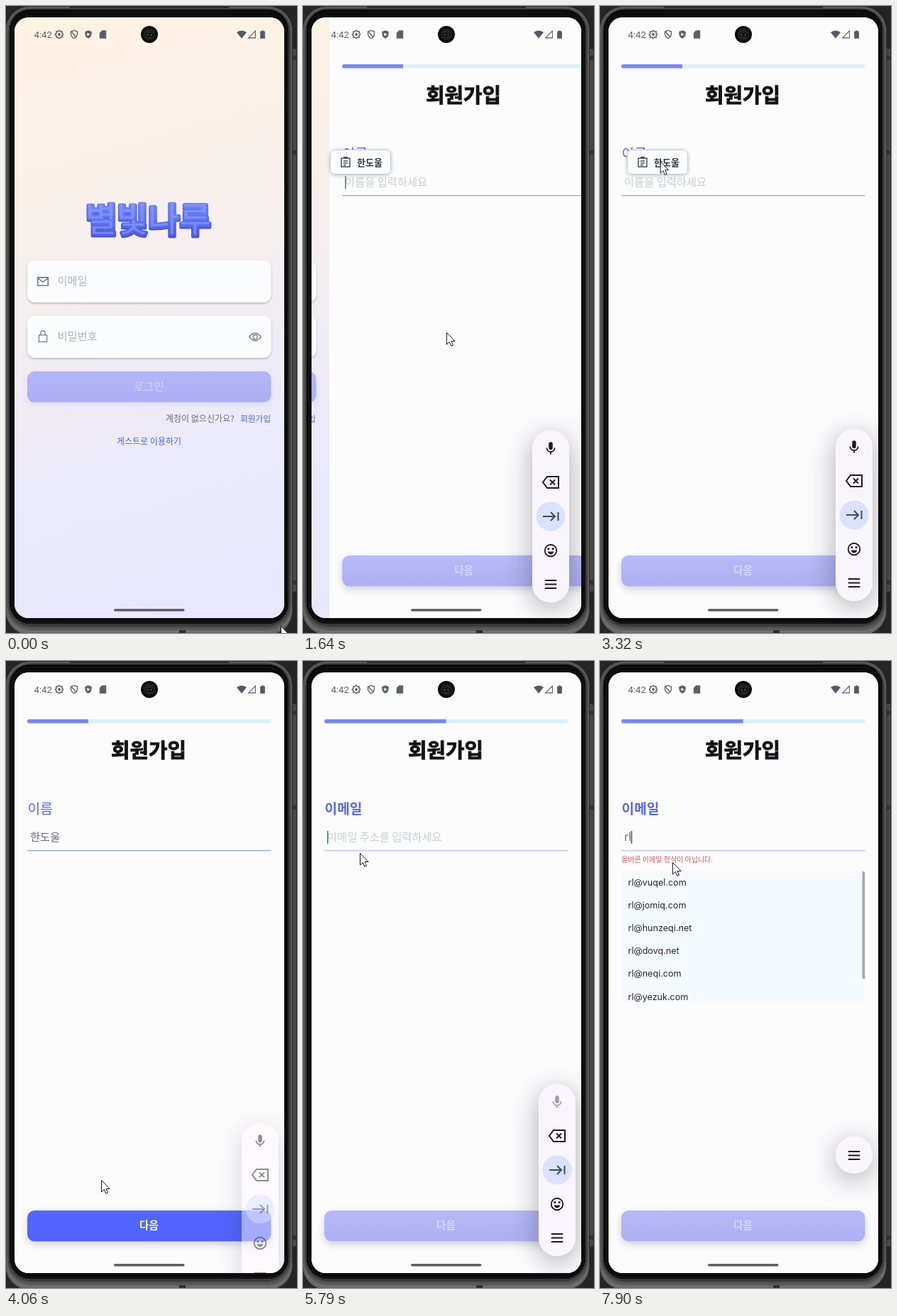
An HTML page with a canvas for the animation above (8000 ms loop, 410 by 882 pixels).

```html
<!DOCTYPE html>
<html lang="ko">
<head>
<meta charset="utf-8">
<title>Sign-up flow</title>
<style>
html, body { margin: 0; width: 100%; height: 100%; overflow: hidden; background: #262626; }
canvas { display: block; width: 410px; height: 882px; }
</style>
</head>
<body>
<canvas id="stage"></canvas>
<script>
const W = 410, H = 882, LOOP = 8000, PAGE = 380;
const canvas = document.getElementById('stage');
const dpr = window.devicePixelRatio || 1;
canvas.width = W * dpr;
canvas.height = H * dpr;
const c = canvas.getContext('2d');

const KR = '"Noto Sans CJK KR", "Noto Sans CJK", sans-serif';
const LATIN = 'Inter, "Noto Sans", sans-serif';
const PERSON = '한도울';
const DOMAINS = ['vuqel.com', 'jomiq.com', 'hunzeqi.net', 'dovq.net', 'neqi.com', 'yezuk.com'];

const clamp = v => Math.max(0, Math.min(1, v));
const mix = (a, b, k) => a + (b - a) * k;
const within = (t, a, b) => t >= a && t < b;
const easeInOut = k => k < 0.5 ? 4 * k ** 3 : 1 - 4 * (1 - k) ** 3;
const slide = (t, start) => easeInOut(clamp((t - start) / 746));

function box(x, y, w, h, r, fill, stroke) {
  c.beginPath();
  c.roundRect(x, y, w, h, r);
  if (fill) { c.fillStyle = fill; c.fill(); }
  if (stroke) { c.strokeStyle = stroke; c.stroke(); }
}

// The shadow stays outside the box, so translucent boxes remain clean
function shadowBox(x, y, w, h, r, fill, color, blur, dy) {
  c.save();
  c.beginPath();
  c.rect(-W, -H, 3 * W, 3 * H);
  c.roundRect(x, y, w, h, r);
  c.clip('evenodd');
  c.shadowColor = color;
  c.shadowBlur = blur * dpr;
  c.shadowOffsetY = dy * dpr;
  box(x, y, w, h, r, '#fff');
  c.restore();
  box(x, y, w, h, r, fill);
}

function dot(x, y, r, fill) {
  c.beginPath();
  c.arc(x, y, r, 0, 7);
  c.fillStyle = fill;
  c.fill();
}

// y is the visual middle of the line; bold thickens the strokes
function text(s, x, y, size, weight, color, { align = 'left', family = KR, bold = 0 } = {}) {
  c.font = `${weight} ${size}px ${family}`;
  c.textAlign = align;
  c.fillStyle = c.strokeStyle = color;
  c.fillText(s, x, y + size * 0.37);
  if (!bold) return;
  c.lineWidth = bold;
  c.strokeText(s, x, y + size * 0.37);
}

function vertical(y0, y1, ...stops) {
  const g = c.createLinearGradient(0, y0, 0, y1);
  stops.forEach((s, i) => g.addColorStop(i / (stops.length - 1), s));
  return g;
}

// Icons live in a 24-unit box centred on zero
const ICONS = {
  mail: 'M-9-7H9V7H-9ZM-9-6L0 1L9-6',
  lock: 'M-7-2H7V10H-7ZM-4-2V-6A4 4 0 0 1 4-6V-2',
  eye: 'M-11 0Q0-14 11 0Q0 14-11 0ZM4 0A4 4 0 1 1-4 0A4 4 0 1 1 4 0',
  mic: 'M0-10A3 3 0 0 1 3-7V-1A3 3 0 0 1-3-1V-7A3 3 0 0 1 0-10ZM-7-1H-5.2A5.2 5.2 0 0 0 5.2-1H7A7 7 0 0 1 1 6V9H-1V6A7 7 0 0 1-7-1Z',
  erase: 'M-5-8H11V8H-5L-11 0ZM-1-3.5L6 3.5M6-3.5L-1 3.5',
  tab: 'M-11 0H6M0-6L6 0L0 6M10.5-6V6',
  face: 'M9 0A9 9 0 1 1-9 0A9 9 0 1 1 9 0',
  grin: 'M-5 1.5H5Q3 6 0 6Q-3 6-5 1.5ZM-5-4H-2V-1H-5ZM2-4H5V-1H2Z',
  menu: 'M-9-6H9M-9 0H9M-9 6H9',
  clip: 'M-8-7H8V9H-8ZM-3-7V-9H3V-7M-4-2H4M-4 2H4M-4 5.5H1',
  shield: 'M0-10L8-7V-1Q7 7 0 10Q-7 7-8-1V-7Z',
  play: 'M-3-4L5 0L-3 4Z',
  card: 'M-2-10H8V10H-8V-4Z',
  wifi: 'M-12-5Q0-14 12-5L0 10Z',
  signal: 'M-9 9H9V-9Z',
  battery: 'M-6-8H-2.5V-10H2.5V-8H6V10H-6Z'
};
for (const k in ICONS) ICONS[k] = new Path2D(ICONS[k]);

// A line width of 0 fills the shape
function icon(name, x, y, size, color, line = 0) {
  c.save();
  c.translate(x, y);
  c.scale(size / 24, size / 24);
  c.fillStyle = c.strokeStyle = color;
  c.lineWidth = line;
  line ? c.stroke(ICONS[name]) : c.fill(ICONS[name]);
  c.restore();
}

function drawPhone() {
  c.fillStyle = '#262626';
  c.fillRect(0, 0, W, H);
  box(398, 60, 11, 764, 3, '#4a4a4a');
  c.fillStyle = '#333';
  for (const y of [70, 203, 808]) c.fillRect(403, y, 6, 6);
  c.lineWidth = 1;
  box(-0.5, 0.5, 404, 884, 34, '#6a6a6a', '#3a3a3a');
  box(2.5, 2.5, 399, 877, 32, '#626262', '#7c7c7c');
  shadowBox(4.5, 4.5, 394, 865, 30, '#0a0a0a', '#000', 8, 1);
  box(7.5, 8.5, 389, 859, 27, '#0c0c0c', '#161616');
  c.fillStyle = '#2e2e2e';
  c.fillRect(90, 0, 224, 3);
  c.fillRect(244, 878, 9, 4);
}

function drawStatus() {
  const ink = '#5d6068';
  text('4:42', 39.5, 40, 13.2, 400, ink, { family: 'Roboto, sans-serif' });
  c.strokeStyle = ink;
  c.lineWidth = 1.4;
  c.beginPath();
  for (let i = 0; i <= 48; i++) {
    const a = i * Math.PI / 24, r = 5 + 0.8 * Math.cos(8 * a);
    c.lineTo(75 + r * Math.cos(a), 40 + r * Math.sin(a));
  }
  c.stroke();
  dot(75, 40, 1.9, ink);
  icon('shield', 96, 40, 13.5, ink, 2.4);
  c.beginPath();
  c.moveTo(92.5, 36.5);
  c.lineTo(99, 44);
  c.stroke();
  icon('shield', 116, 40, 14, ink);
  icon('play', 116, 40, 13, '#fff');
  icon('card', 136.5, 40, 14, ink);
  icon('wifi', 332, 40, 14, '#515a67');
  icon('signal', 346.5, 40, 13, '#515a67', 2);
  icon('battery', 361.5, 40, 13.5, '#515a67');
  dot(202, 40, 12, '#0c0c0c');
  dot(202, 40, 8, '#222');
  box(196, 38, 12, 5, 2.5, '#101010');
  dot(199.5, 40.5, 0.9, '#777');
  dot(204.5, 40.5, 0.9, '#777');
}

// Puffy lettering: dark rim, shaded body, light core
function drawWordmark() {
  const word = '별빛나루', x = 200.5, y = 300;
  c.lineJoin = 'round';
  text(word, x, y + 0.8, 48, 700, '#4350cc', { align: 'center', bold: 5 });
  text(word, x, y, 48, 700, vertical(274, 328, '#7488f8', '#5f74f4', '#4a56dc'), { align: 'center', bold: 3.6 });
  text(word, x - 0.5, y - 1.2, 48, 300, 'rgba(140,162,255,.6)', { align: 'center' });
  c.lineJoin = 'miter';
}

function drawLogin() {
  const g = c.createLinearGradient(70, 16, 320, 861);
  g.addColorStop(0, '#fff3e2');
  g.addColorStop(0.4, '#f6efee');
  g.addColorStop(0.8, '#e9e9fc');
  g.addColorStop(1, '#e7e8ff');
  c.fillStyle = g;
  c.fillRect(12, 16, PAGE, 845);
  drawWordmark();
  for (const y of [358, 436])
    shadowBox(30, y, 343.5, 59, 11, '#fbfcfe', 'rgba(60,60,90,.35)', 3, 1.5);
  const ink = '#77778b';
  icon('mail', 52, 387.5, 19.5, ink, 2);
  icon('lock', 52, 464.5, 19, ink, 1.6);
  icon('eye', 351, 465.5, 18, ink, 1.7);
  text('이메일', 72.5, 386, 15.2, 400, '#b0afc2');
  text('비밀번호', 72.5, 464, 15.2, 400, '#b0afc2');
  shadowBox(30, 514, 343.5, 43.5, 10, vertical(514, 557, '#b3b6f6', '#abaef4'), 'rgba(140,145,225,.2)', 9, 3);
  text('로그인', 201.5, 535, 15.2, 400, '#d3d5fa', { align: 'center' });
  text('계정이 없으신가요?', 225, 580.5, 12, 400, '#6d6b7c');
  text('회원가입', 373, 580.5, 11.7, 500, '#5063f3', { align: 'right' });
  text('게스트로 이용하기', 201.5, 613, 12, 400, '#4a60f4', { align: 'center' });
}

function drawForm({ progress, label, weight, hint, value, caret, caretColor, enabled, line }) {
  c.fillStyle = '#fcfcfd';
  c.fillRect(12, 16, PAGE, 845);
  box(30, 82, 343.5, 5.5, 3, '#daf2ff');
  box(30, 82, 343.5 * progress, 5.5, [3, 0, 0, 3], '#7986fb');
  text('회원가입', 201, 125, 28.8, 900, '#131316', { align: 'center', bold: 0.9 });
  text(label, 30.5, 208, 19.2, weight, '#5667f0');
  text(value || hint, 34, 247, 15.3, 300, value ? '#666b84' : '#cbcdd2');
  if (caret) {
    c.fillStyle = caretColor;
    c.fillRect(caret, 239, 1.6, 18);
  }
  c.fillStyle = line;
  c.fillRect(30, 266, 343.5, 1.4);
  const fill = enabled ? '#5265ff' : vertical(773, 816, '#b6baf7', '#abb0f1');
  shadowBox(30, 773, 343.5, 43.5, 10, fill, 'rgba(70,75,110,.24)', 11, 4);
  text('다음', 201.5, 794, 14.6, 700, enabled ? '#fff' : '#d3d6f8', { align: 'center' });
}

function drawName(t) {
  const pasted = t >= 3500;
  const focused = t < 2000 || within(t, 2750, 3250) || within(t, 3500, 3900);
  drawForm({
    progress: 0.25, label: '이름', weight: 500, hint: '이름을 입력하세요',
    value: pasted ? PERSON : '', caret: focused && (pasted ? 77 : 34),
    caretColor: '#6b7078', enabled: pasted, line: '#9fa8f1'
  });
}

function drawEmail(t) {
  const typed = t < 6600 ? '' : t < 7900 ? 'r' : 'rl';
  const shown = within(t, 5600, 6100) || within(t, 6600, 7700) || t >= 7900;
  drawForm({
    progress: 0.5, label: '이메일', weight: 700, hint: '이메일 주소를 입력하세요',
    value: typed, caret: shown && [34, 40.5, 43.7][typed.length],
    caretColor: typed ? '#555a68' : '#17907f', line: '#bfc5f4'
  });
  if (t < 6670) return;
  text('올바른 이메일 형식이 아닙니다.', 30, 279.5, 10, 400, '#d4545d');
  c.save();
  c.beginPath();
  c.rect(30, 296, 343.5, 184);
  c.clip();
  c.fillStyle = '#f5faff';
  c.fillRect(30, 296, 343.5, 184);
  DOMAINS.forEach((d, i) =>
    text(`${typed}@${d}`, 39.5, 311 + i * 32.2, 12.6, 400, '#25272c', { family: LATIN }));
  box(369.5, 296, 4, 151, [0, 3, 0, 0], '#a7a7b1');
  c.restore();
}

function drawChip() {
  shadowBox(38, 202, 86, 35, 7, '#fff', 'rgba(50,60,90,.35)', 5, 1);
  c.lineWidth = 1;
  box(38.5, 202.5, 85, 34, 7, '#fdfdff', '#c9ccd6');
  icon('clip', 60, 219.5, 18, '#4a4d57', 2);
  text(PERSON, 76, 220, 13, 700, '#33363e');
}

// Each visit: shown from, hidden from, left, top
const VISITS = [[1400, 2000, 323, 597], [2750, 4000, 332, 595], [5250, LOOP, 332, 595]];

function drawToolbar(t) {
  const visit = VISITS.find(v => within(t, v[0], v[1] + 120));
  if (!visit) return;
  const [from, to, x, restY] = visit;
  const alpha = Math.min(clamp((t - from) / 150), clamp(1 - (t - to) / 120));
  const fold = easeInOut(clamp((t - 6600) / 280));
  const y = mix(restY, 669, fold) + 108 * (1 - alpha);
  const h = mix(242, 52, fold), cx = x + 26, ink = '#1d1b20';
  c.save();
  c.globalAlpha = alpha;
  shadowBox(x, y, 52, h, 26, '#f8f5fd', 'rgba(30,30,45,.36)', 38, 8);
  icon('menu', cx, y + h - 25.5, 22, ink, 2.2);
  c.globalAlpha = alpha * clamp(1 - fold * 2);
  if (c.globalAlpha > 0) {
    icon('mic', cx, y + 25.5, 22, from > 5000 ? '#a19fa8' : ink);
    icon('erase', cx, y + 73, 24, ink, 2);
    dot(cx, y + 121, 20.5, '#d9e2ff');
    icon('tab', cx, y + 121, 24, '#44465a', 2);
    icon('face', cx, y + 169, 22, ink, 2);
    icon('grin', cx, y + 169, 22, ink);
  }
  c.restore();
}

// Pointer tip: time, x, y
const TRAIL = [
  [70, 387, 872], [400, 300, 610], [620, 235, 533], [950, 324, 571], [1250, 324, 571],
  [1640, 202, 459], [2350, 167, 265], [2800, 165, 250], [3350, 84, 218], [3540, 84, 218],
  [4060, 134, 730], [4230, 138, 790], [4800, 138, 790], [5700, 80, 270], [5860, 80, 270],
  [6060, 74, 236], [6330, 84, 262], [6600, 84, 262], [7000, 102, 283]
];

function drawPointer(t) {
  let i = TRAIL.findIndex(p => p[0] > t);
  if (i < 0) i = TRAIL.length - 1;
  const b = TRAIL[i], a = TRAIL[Math.max(0, i - 1)];
  const k = clamp((t - a[0]) / (b[0] - a[0] || 1));
  const s = k * k * (3 - 2 * k);
  c.save();
  c.translate(mix(a[1], b[1], s) + 0.5, mix(a[2], b[2], s) + 0.5);
  const arrow = new Path2D('M0 0V16.5L3.8 13L6.3 18.8L9 17.6L6.6 12H11.6Z');
  c.fillStyle = '#fff';
  c.strokeStyle = '#15151c';
  c.lineWidth = 1;
  c.fill(arrow);
  c.stroke(arrow);
  c.restore();
}

function drawPage(dx, draw, t) {
  if (Math.abs(dx) >= PAGE) return;
  c.save();
  c.translate(dx, 0);
  c.beginPath();
  c.rect(12, 16, PAGE, 845);
  c.clip();
  draw(t);
  c.restore();
}

function render(t) {
  c.setTransform(dpr, 0, 0, dpr, 0, 0);
  drawPhone();
  c.save();
  c.beginPath();
  c.roundRect(12, 16, 380, 845, 20);
  c.clip();
  c.fillStyle = '#fcfcfd';
  c.fillRect(12, 16, PAGE, 845);
  const pos = slide(t, 1085) + slide(t, 4480);
  [drawLogin, drawName, drawEmail].forEach((draw, i) => drawPage((i - pos) * PAGE, draw, t));
  if (within(t, 1500, 2000) || within(t, 2900, 3500)) drawChip();
  drawToolbar(t);
  drawStatus();
  box(152, 848, 99.5, 3.4, 2, '#5f6064');
  c.restore();
  drawPointer(t);
}

function tick() {
  render(performance.now() % LOOP);
  requestAnimationFrame(tick);
}
tick();
</script>
</body>
</html>
```
